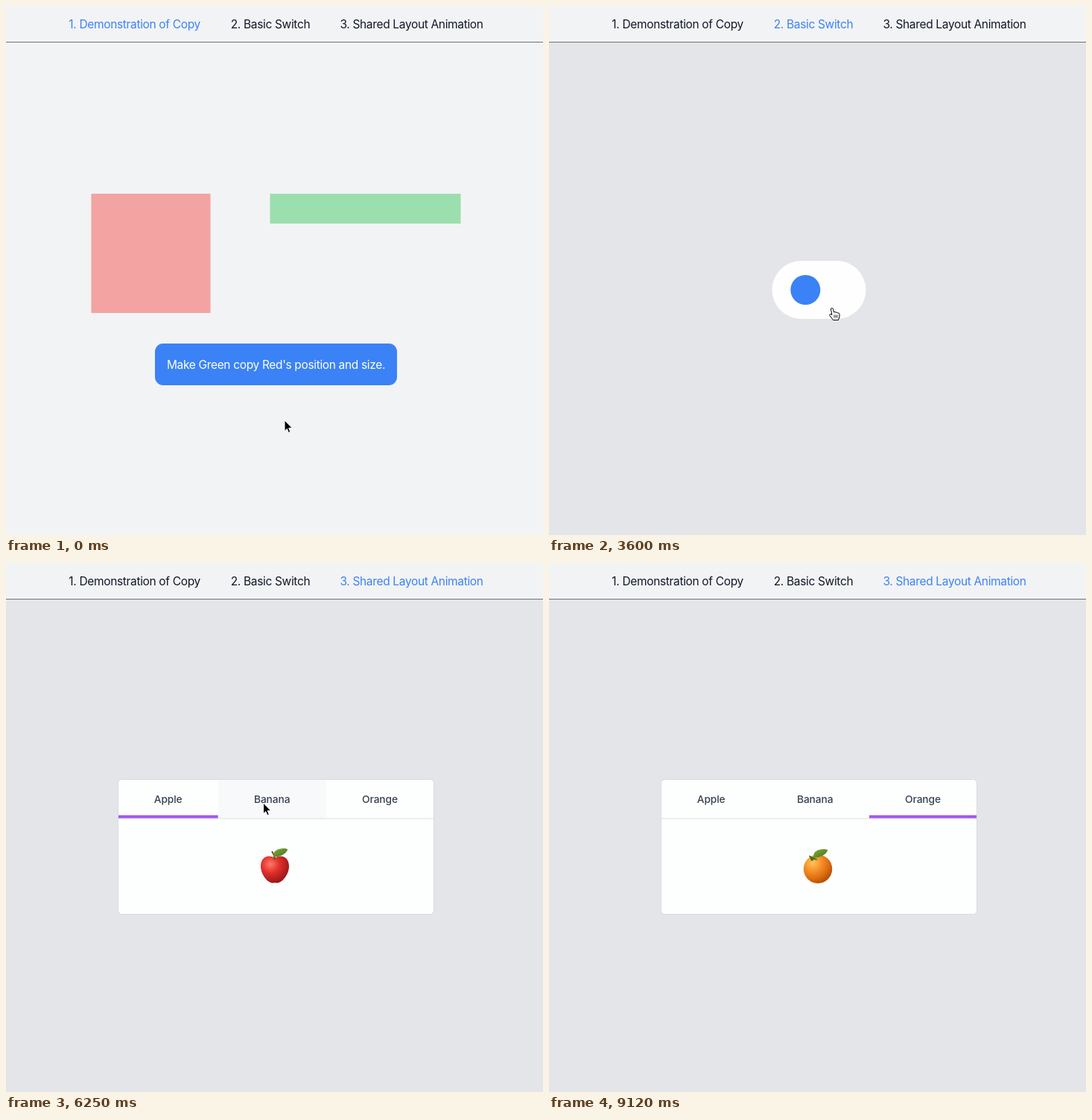
These frames come from a looping animation (721x710 px, 9300 ms). An HTML page:

```html
<!DOCTYPE html>
<html lang="en">
<head>
<meta charset="utf-8">
<title>Layout animation demos</title>
<style>
  html, body { margin: 0; width: 100%; height: 100%; overflow: hidden; background: #f2f3f5; }
  svg { display: block; width: 721px; height: 710px; }
  text { font: 15.5px Inter, "Open Sans", sans-serif; letter-spacing: -.34px; text-anchor: middle; fill: #111827; }
  .tabs text { font-size: 13.75px; font-weight: 500; letter-spacing: -.1px; fill: #364152; }
</style>
</head>
<body>
<svg viewBox="0 0 721 710">
  <defs>
    <radialGradient id="orangeSkin" cx=".32" cy=".28" r=".8">
      <stop offset="0" stop-color="#ffc45c"/><stop offset=".35" stop-color="#f7942c"/>
      <stop offset=".7" stop-color="#dd6c10"/><stop offset="1" stop-color="#a94a08"/>
    </radialGradient>
    <radialGradient id="appleSkin" cx=".34" cy=".3" r=".8">
      <stop offset="0" stop-color="#ff7a68"/><stop offset=".4" stop-color="#e0302b"/>
      <stop offset="1" stop-color="#8e1016"/>
    </radialGradient>
    <linearGradient id="bananaSkin" x2="1" y2="1">
      <stop offset="0" stop-color="#ffe573"/><stop offset="1" stop-color="#e0a51c"/>
    </linearGradient>
    <linearGradient id="leafGreen" y2="1">
      <stop offset="0" stop-color="#86b03b"/><stop offset="1" stop-color="#3f6d1d"/>
    </linearGradient>
    <clipPath id="cardClip"><rect x="151" y="291" width="423" height="180" rx="5"/></clipPath>
    <path id="leaf" d="M354.5 396Q355 385 366 384.300Q371 383.500 374.500 385.500Q370 395 354.500 396Z" fill="url(#leafGreen)"/>
  </defs>

  <rect id="page" y="49" width="721" height="661"/>
  <path d="M0 48.5H721" stroke="#6f7277"/>
  <g id="nav">
    <text x="172.6" y="30">1. Demonstration of Copy</text>
    <text x="355" y="30">2. Basic Switch</text>
    <text x="544.5" y="30">3. Shared Layout Animation</text>
  </g>

  <g class="scene">
    <rect x="114.5" y="252" width="160" height="160" fill="rgba(244,111,108,.6)"/>
    <rect id="green" y="252" fill="rgba(99,210,128,.6)"/>
    <rect x="200" y="453" width="325" height="56" rx="11" fill="#3b82f6"/>
    <text x="362.5" y="487" style="fill:#fff">Make Green copy Red's position and size.</text>
  </g>

  <g class="scene">
    <rect x="299.5" y="342" width="126" height="78" rx="39" fill="#fefefe"/>
    <circle id="knob" cy="381" r="20" fill="#3b82f6"/>
  </g>

  <g class="scene tabs">
    <rect x="150.5" y="290.5" width="424" height="181" rx="5" fill="#fdfefe" stroke="#d9dade"/>
    <g clip-path="url(#cardClip)">
      <rect id="hover" y="291" height="52" fill="#f8f9fb"/>
      <path d="M151 343H574" stroke="#e7e8eb" stroke-width="1.5"/>
      <rect id="bar" y="338.5" height="4" fill="#a556ee"/>
    </g>
    <text x="217.7" y="321.7">Apple</text>
    <text x="357.2" y="321.7">Banana</text>
    <text x="502" y="321.7">Orange</text>

    <g class="fruit">
      <path d="M361 396C370 390 380 395 380 407S369 432 361 429C353 432 342 419 342 407S352 390 361 396Z" fill="url(#appleSkin)"/>
      <path d="M361 398Q360 391 357 387" fill="none" stroke="#6b421f" stroke-width="2"/>
      <use href="#leaf" x="4" y="-1"/>
    </g>
    <g class="fruit">
      <path d="M370 385L374 384L375 392C387 409 375 430 349 430L343 428V424C361 422 370 409 369 393Z" fill="url(#bananaSkin)"/>
      <path d="M370 385L374 384L375 390L370 391ZM343 424H347L348 429L343 428Z" fill="#75602a"/>
    </g>
    <g class="fruit">
      <circle cx="361" cy="410.7" r="19.2" fill="url(#orangeSkin)"/>
      <path d="M349.5 393L360 398L355 397.5L353 400Z" fill="#4a6a1c" stroke="#4a6a1c"/>
      <use href="#leaf"/>
    </g>
  </g>

  <g id="cursor">
    <path id="arrow" d="M0 0V14.5L3.3 11.5L5.4 16.6L7.8 15.6L5.700 10.600H10.300Z" stroke="#fff"/>
    <g id="hand" fill="#fff" stroke="#000" stroke-linejoin="round">
      <path d="M2.500 2C2.500 0 5 0 5.500 1.800L6.500 6Q8 4.700 9 6.300Q10.700 5.300 11.500 7Q13.600 6.500 14 8.500V12L12.500 16.500H5.500L1 10.500C0 8.500 2 7.700 3.800 9.700Z"/>
      <path d="M7 9.500V13.500M9 9.500V13.500M11 9.500V13.500" stroke-width=".8"/>
    </g>
  </g>
</svg>

<script>
const LOOP = 9300, EXIT = 9110, TAB_BEAT = 518;
const $ = id => document.getElementById(id);
const navItems = [...$('nav').children];
const scenes = [...document.querySelectorAll('.scene')];
const fruits = [...document.querySelectorAll('.fruit')];
const tabs = [{ x: 151, w: 134 }, { x: 285, w: 145 }, { x: 430, w: 145 }];

// Regular clicks stepping through the choices 0 .. choices-1, starting at 0.
const clicksEvery = (beat, first, count, choices) => Array.from({ length: count }, (_, i) =>
  ({ time: first + i * beat, value: (i + 1) % choices }));

const sceneClicks = clicksEvery(2730, 1600, 2, 3);
const copyClicks = clicksEvery(340, 400, 2, 2);
const switchClicks = clicksEvery(293, 2400, 6, 2);
const tabClicks = clicksEvery(TAB_BEAT, 4750, 8, 3);

// Places where the pointer stays for a while.
const stop = (x, y, arrive, leave = arrive) => ({ x, y, arrive, leave });
const stops = [
  stop(374, 556, 0, 110),
  stop(365, 490, 370, 760),
  stop(335, 564, 1050),
  stop(358, 219, 1170, 1220),
  stop(340, 32, 1450, 1800),
  stop(376, 405, 2200, 3900),
  stop(530, 26, 4200, 4360),
  ...tabClicks.map(({ time, value }) =>
    stop(tabs[value].x + tabs[value].w / 2 - 12, 322, time - 185 + (time < 4800 ? 140 : 0), time + 165)),
  stop(691, 706, EXIT, LOOP)
];

const mix = (a, b, k) => a + (b - a) * k;
const valueAt = (clicks, t) => clicks.findLast(click => click.time <= t)?.value ?? 0;

function spring(ms) {
  const s = ms / 1000, decay = 12.2, swing = 18.8;
  return 1 - Math.exp(-decay * s) * (Math.cos(swing * s) + decay / swing * Math.sin(swing * s));
}
const easeOut = ms => 1 - (1 - Math.min(ms / 300, 1)) ** 3;

// Runs a value through every choice so far, each move starting where the last one was cut off.
function follow(clicks, t, ease, toValue = v => v) {
  let value = toValue(0);
  clicks.forEach((click, i) => {
    if (click.time > t) return;
    const end = Math.min(t, clicks[i + 1]?.time ?? t);
    value = mix(value, toValue(click.value), ease(end - click.time));
  });
  return value;
}

// Moves swing upwards in an arc that grows with the sideways distance.
function pointerAt(t) {
  const i = stops.findLastIndex(({ arrive }) => arrive <= t);
  const from = stops[i], to = stops[i + 1];
  if (!to || t <= from.leave) return [from.x, from.y];
  const p = (t - from.leave) / (to.arrive - from.leave), k = p * p * (3 - 2 * p);
  const lift = Math.abs(to.x - from.x) / 16 * Math.sin(Math.PI * k);
  return [mix(from.x, to.x, k), mix(from.y, to.y, k) - lift];
}

function set(el, attrs) {
  for (const name in attrs) el.setAttribute(name, attrs[name]);
}
const show = (el, on) => { el.style.display = on ? '' : 'none'; };
const inside = (x, y, left, top, right, bottom) => x >= left && x <= right && y >= top && y <= bottom;

function draw(t) {
  const scene = valueAt(sceneClicks, t);
  const [x, y] = pointerAt(t);
  scenes.forEach((el, i) => show(el, i === scene));
  navItems.forEach((el, i) => { el.style.fill = i === scene ? '#3b82f6' : ''; });
  set($('page'), { fill: scene ? '#e4e5e9' : '#f2f3f5' });

  const copy = follow(copyClicks, t, easeOut);
  set($('green'), { x: mix(354.5, 114.5, copy), width: mix(256, 160, copy), height: mix(40, 160, copy) });
  set($('knob'), { cx: mix(335, 390, follow(switchClicks, t, spring)) });

  const selected = valueAt(tabClicks, t);
  fruits.forEach((el, i) => show(el, i === selected));
  set($('bar'), {
    x: follow(tabClicks, t, spring, i => tabs[i].x),
    width: follow(tabClicks, t, spring, i => tabs[i].w)
  });
  const hovered = tabs.find(tab => inside(x, y, tab.x, 291, tab.x + tab.w, 343));
  show($('hover'), hovered);
  if (hovered) set($('hover'), { x: hovered.x, width: hovered.w });

  const overLink = inside(x, y, 84, 12, 641, 36)
    || scene === 0 && inside(x, y, 200, 453, 525, 509)
    || scene === 1 && inside(x, y, 300, 342, 425, 420);
  show($('hand'), overLink);
  show($('arrow'), !overLink);
  show($('cursor'), t < EXIT);
  set($('cursor'), { transform: `translate(${x} ${y})` });
}

const start = performance.now();
function tick() {
  draw((performance.now() - start) % LOOP);
  requestAnimationFrame(tick);
}
tick();
</script>
</body>
</html>
```
